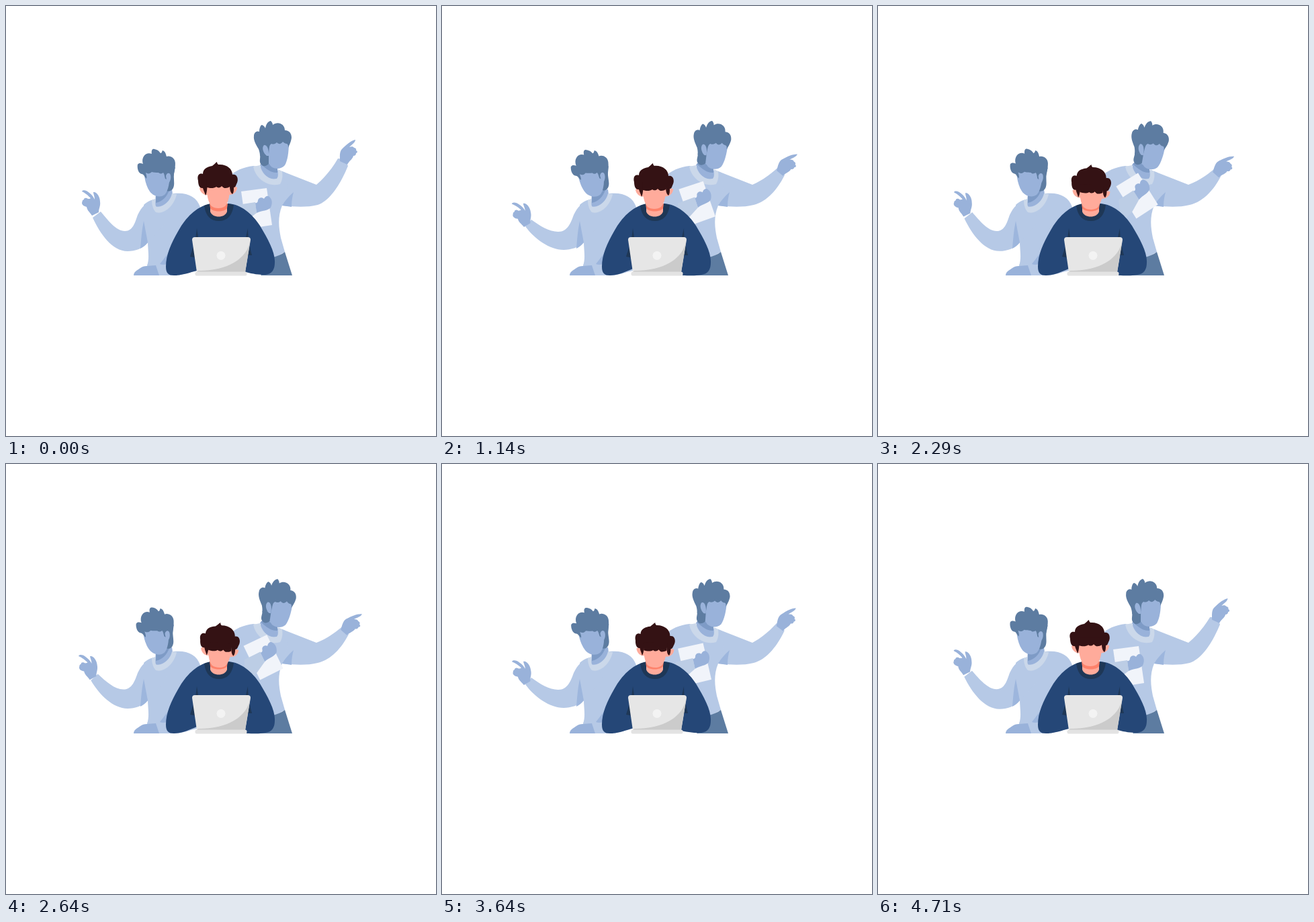
Recreate the animation shown at these times as an HTML page. Size 640x640 px, loop 4780 ms.

```html
<!DOCTYPE html>
<html lang="en">
<head>
<meta charset="utf-8">
<title>Busy at the laptop</title>
<style>
html, body { margin: 0; width: 100%; height: 100%; overflow: hidden; background: #fff; }
svg { display: block; width: 100vw; height: 100vh; }
.shirt { fill: #b6c9e6; }
.cuff { fill: #bccde5; }
.skin { fill: #99b2da; }
.hair { fill: #5d7ca1; }
.fold { fill: #9db6dd; }
.rib { fill: #cbd8ea; }
.shade { fill: #7e9bc6; }
.paper { fill: #f1f4fa; }
.navy { fill: #254777; }
.dark { fill: #1e3756; }
.face { fill: #ffab9b; }
.brown { fill: #341214; }
</style>
</head>
<body>
<svg viewBox="0 0 640 640" xmlns="http://www.w3.org/2000/svg">
  <!-- left colleague -->
  <g>
    <path class="shirt" d="M205 296C210 291 217 288 224 287L250 279C270 277 284 284 289 299L284 394C270 397 262 401 250 401L214 401 210 386C214 376 211 362 211 350Z"/>
    <path class="shirt" id="armL"/>
    <path class="fold" d="M205 320C202 334 201 348 200 361 204 359 208 356 211 352Z"/>
    <path class="fold" d="M229 384L243 366 243 382C239 385 234 386 229 384Z"/>
    <path class="skin" d="M190 401C190 395 196 393 200 390 205 386 213 387 223 386L228 401Z"/>
    <path class="skin" d="M223 276L247 273 248 280C244 292 231 301 222 298Z"/>
    <path class="shade" d="M223 281L243 274C240 283 233 291 223 293Z"/>
    <path class="rib" d="M217 289L223 287C222 293 222 297 224 299 234 300 245 290 247 279L254 280C251 296 236 311 223 307 219 303 217 296 217 289Z"/>
    <g id="headL">
      <path class="hair" d="M240 246L252 240C248 252 251 260 250 267 249 274 244 277 239 275Z"/>
      <path class="skin" d="M205 244L243 244C245 262 241 276 236 281 229 286 219 283 214 276 209 269 206 258 205 244Z"/>
      <path class="hair" d="M209 257C206 254 205 250 202 250 197 249 195 241 196 236 198 233 201 234 204 235 201 227 207 216 217 220 216 215 218 212 221 213 226 214 228 216 230 219 232 219 232 217 233 215 237 216 238 220 239 224 244 222 252 226 252 234 252 244 250 250 248 259L243 260 237 257C236 254 236 250 234 248 231 250 229 250 227 248 224 248 220 248 217 247 214 250 211 250 208 248 209 252 210 254 209 257Z"/>
      <path class="skin" d="M238 253C239 248 244 247 245 252 246 257 244 263 240 265Z"/>
    </g>
    <path class="skin" id="handL" d="M128 312C125 307 121 305 120 299 116 298 113 296 113 293 114 291 113 289 116 288 116 285 120 285 122 287 124 287 125 287 126 286 122 282 119 279 113 276 114 273 120 274 124 278 128 281 130 284 132 288 132 283 130 280 130 277 135 276 140 284 140 291 141 298 138 301 138 307Z"/>
  </g>

  <!-- right colleague -->
  <g>
    <path class="shirt" d="M326 262C336 246 352 240 368 238L411 246C420 250 428 254 432 257L428 278 411 297C404 314 406 330 409 345L415 366 398 376 340 376Z"/>
    <path class="hair" d="M398 374C404 372 410 370 415 366L426 401 379 401Z"/>
    <path class="shirt" id="armR"/>
    <path class="fold" d="M428 277C421 283 415 290 411 297L425 299C425 291 426 284 428 277Z"/>
    <path class="skin" d="M378 236L390 230 404 240 405 256C394 262 381 251 378 236Z"/>
    <path class="shade" d="M384 231L404 241 404 248C395 249 388 243 379 235Z"/>
    <path class="rib" d="M368 239L378 237C380 249 391 260 403 257 406 253 405 248 405 243L411 246C412 254 411 260 408 265 392 270 372 259 368 239Z"/>
    <g id="headR">
      <path class="skin" d="M388 202L421 202C421 218 419 230 415 237 410 243 401 243 396 240 392 237 390 232 389 226Z"/>
      <path class="hair" d="M378 222C379 227 376 232 380 236 383 240 388 238 391 235L391 220Z"/>
      <path class="hair" d="M376 213C372 206 368 200 369 193 369 189 373 185 377 187 377 182 379 177 381 177 384 178 385 180 386 182 387 177 389 172 394 171 396 173 397 175 397 177 404 171 415 175 415 185 422 185 425 190 425 196 424 203 422 206 420 211 420 208 420 206 418 205 416 205 414 204 412 202 409 206 406 206 403 203 400 206 397 206 395 205 391 207 392 213 391 220L378 223C378 219 377 216 376 213Z"/>
      <path class="skin" d="M391 220C391 212 388 206 384 207 380 211 383 219 388 223L391 223Z"/>
    </g>
    <path class="skin" id="handR" d="M497 231C497 225 496 217 500 213 505 208 512 201 520 199 520 203 515 206 511 210 514 209 517 209 518 211 520 211 522 213 521 215 524 216 523 219 521 219 521 222 519 223 517 223 516 228 511 230 508 236Z"/>
    <g id="sheet">
      <path class="paper" d="M350 276L388 271 396 326 358 332Z"/>
      <path class="cuff" d="M345 296L371 292 373 308 357 320 335 330Z"/>
      <path class="skin" d="M371 293C374 294 375 291 375 289 376 285 381 284 384 287 386 283 390 281 393 285 397 289 396 296 394 300 390 305 381 304 373 308Z"/>
    </g>
  </g>

  <!-- man at the laptop -->
  <g>
    <path class="navy" id="body"/>
    <path class="dark" d="M284 331C283 346 278 361 274 373L284 375 286 344Z"/>
    <path class="dark" d="M360 331C360 346 363 360 366 371L358 371 357 344Z"/>
    <path class="dark" d="M295 297C297 313 305 320 317 320 329 320 337 312 339 296L329 294 304 294Z"/>
    <path class="face" d="M304 285L329 285 329 306C326 316 307 316 304 306Z"/>
    <path d="M303 294L330 294 329 301C325 307 308 307 304 301Z" fill="#fd826b"/>
    <g id="headM">
      <path class="face" id="face" d="M299 264L333 264C334 280 331 293 326 298 321 302 311 302 306 298 301 293 298 280 299 264Z"/>
      <path class="face" id="ears" d="M300 281C294 282 289 277 288 271 291 268 294 271 300 270ZM332 281C340 281 344 275 344 270 341 268 338 270 332 270Z"/>
      <path class="brown" id="cap" d="M297 282C296 278 294 275 293 271 288 272 286 266 286 260 284 253 287 248 293 250 293 242 300 239 307 238 310 236 312 233 314 232 314 234 315 235 316 236 328 235 337 242 337 251 344 249 347 258 343 265 342 268 341 270 339 270 339 274 339 278 337 280 334 278 333 273 333 267L300 267C299 272 299 279 297 282Z"/>
      <path class="brown" id="fringe" d="M298 258L334 258 333 269C330 271 327 271 325 271 323 270 322 269 321 268 319 271 315 271 313 269 309 272 303 271 299 270Z"/>
    </g>
  </g>

  <!-- laptop -->
  <path d="M281 344L360 344Q364 344 364 348L356 396 284 396 277 348Q277 344 281 344Z" fill="#e6e6e6"/>
  <path d="M363.500 349C359 377 329 394 286 394L284 396 356 396Z" fill="#cbcbcb"/>
  <circle cx="320" cy="371.500" r="6.500" fill="#f3f3f3"/>
  <rect x="281.500" y="395.500" width="77" height="6" rx="2.500" fill="#e3e3e3"/>
</svg>

<script>
const LOOP = 4780, SWING = LOOP / 2, STEP = 1000 / 14;

const node = id => document.getElementById(id);
const clamp = x => Math.max(0, Math.min(1, x));
const smooth = x => x * x * (3 - 2 * x);
const soft = x => Math.sin(x * Math.PI / 2);

// 0 up to 1 between a and b, held, then back to 0 between c and d
const ramp = (t, a, b, c, d) => clamp(Math.min((t - a) / (b - a), (d - t) / (d - c)));

function pose(id, angle, px, py, dx = 0, dy = 0) {
  node(id).setAttribute("transform", `translate(${dx} ${dy}) rotate(${angle} ${px} ${py})`);
}

// the sleeve bends from the shoulder to a wrist that drops by k
function drawLeft(t) {
  const k = soft(ramp(t, 0, 700, 1250, 2350));
  const sway = 1.3 - 7.8 * ramp(t, -130, 600, 900, 2330);
  node("armL").setAttribute("d", `M${141 - 8 * k} ${306 + 12 * k}
    C${152 - 7 * k} ${319 + 8 * k} ${164 - 4 * k} ${335 + k} ${177 - 4 * k} ${335 + k}
    ${189 - 2 * k} ${335 + k} 192 322 196 311 202 298 210 291 224 287
    L240 320 211 352C204 ${361 - 2 * k} 192 ${365 - 2 * k} 181 ${365 - 2 * k}
    ${158 + 2 * k} ${365 - 2 * k} ${140 - 3 * k} ${339 + 7 * k} ${129 - 5 * k} ${315 + 13 * k}Z`);
  pose("handL", sway, 134, 307, -6.5 * k, 16.5 * k);
  pose("headL", sway, 231, 284);
}

function drawRight(t) {
  const lean = ramp(t, 0, 1700, 2300, 4710);
  const k = soft(lean);
  node("armR").setAttribute("d", `M411 246L462 266
    C${475 + k} ${255 + 6 * k} ${486 + 3 * k} ${241 + 11 * k} ${494 + 6 * k} ${227 + 16 * k}
    ${500 + 5 * k} ${227 + 17 * k} ${506 + 3 * k} ${231 + 17 * k} ${509 + k} ${238 + 16 * k}
    ${498 + 2 * k} ${265 + 8 * k} ${482 + 3 * k} ${290 + k} 464 296
    448 300 430 299 411 297L420 270Z`);
  pose("handR", 18 * k, 503, 231, k, 18 * k);
  pose("headR", 9.5 * lean, 398, 245);
  pose("sheet", -24 * lean * lean, 334.5, 262);
}

function drawMan(t) {
  const rest = smooth(ramp(t, 0, 1140, 2930, 4000));
  const nod = smooth(ramp(t, 450, 1850, 4000, 4710));
  const tilt = 5 * smooth(ramp(t, 1300, 3000, 3000, 4400));
  node("body").setAttribute("d", `M309 294C289 295 273 309 261 327 249 347 238 367 238 388
    238 398 242 401 250 401 262 401 272 ${397 - rest} 284 ${394 - 3 * rest}
    L320 380 357 ${396 + 5 * rest}C368 ${399 + 2 * rest} 376 ${400 + 2 * rest} 386 400
    396 399 400 392 400 382 401 367 390 347 378 327 366 309 350 295 330 294Z`);
  const drop = { face: 2, ears: 5, cap: 4, fringe: 8 };
  for (const id in drop) pose(id, 0, 0, 0, 0, drop[id] * nod);
  pose("headM", tilt, 316, 304);
}

function draw(time) {
  const t = Math.floor((time % LOOP + 2) / STEP) * STEP;
  drawLeft(t % SWING);
  drawRight(t);
  drawMan(t);
}

const start = performance.now();
function tick() {
  draw(performance.now() - start);
  requestAnimationFrame(tick);
}
tick();
</script>
</body>
</html>
```
